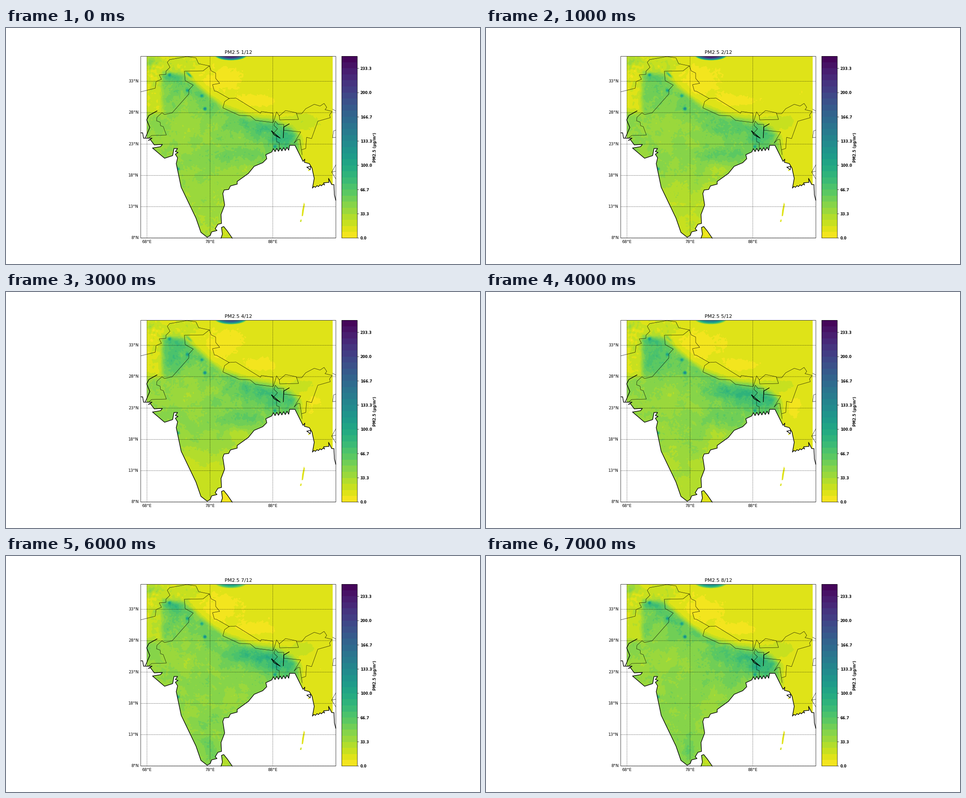
A matplotlib script that plays this animation: 1058x529 px, repeating every 8 s.

```python
import matplotlib.pyplot as plt
import numpy as np
from matplotlib.animation import FuncAnimation
from matplotlib.colors import ListedColormap
from matplotlib.patches import PathPatch, Rectangle
from matplotlib.path import Path

W, H = 1058, 529
BANDS, V_MAX = 30, 250
TOP, BOTTOM = 0.12 * H, 0.89 * H
DEGREE = (BOTTOM - TOP) / 29
LEFT = 518.5 - 15.5 * DEGREE
RIGHT = 518.5 + 15.5 * DEGREE
DATA_LEFT, DATA_RIGHT = LEFT + 0.95 * DEGREE, RIGHT - 0.5 * DEGREE

plt.rcParams["font.family"] = "DejaVu Sans"
plt.rcParams["path.snap"] = False
viridis_r = plt.get_cmap("viridis_r")
CMAP = ListedColormap([viridis_r((i + 0.5) / BANDS) for i in range(BANDS)])


# ---- map outlines, in pixels -------------------------------------------

def zigzag(start, end, steps, height):
    """Points from start to end, every second one pushed up."""
    x = np.linspace(start[0], end[0], steps)
    y = np.linspace(start[1], end[1], steps) - height * (np.arange(steps) % 2)
    return list(zip(x, y))


WEST_COAST = [
    (301, 235), (305, 235), (307, 247), (314, 247), (326, 247), (318, 252),
    (322, 250), (331, 262), (349, 261), (345, 266), (327, 269), (354, 292),
    (372, 286), (375, 270), (383, 270), (378, 277), (384, 279), (378, 283),
    (383, 291), (380, 304), (391, 357), (424, 426), (435, 458), (449, 469)]
EAST_COAST = [
    (456, 465), (459, 457), (471, 454), (467, 450), (473, 440), (481, 438),
    (480, 418), (488, 397), (484, 371), (487, 363), (497, 362), (501, 354),
    (516, 350), (516, 344), (541, 326), (554, 310), (573, 302), (582, 293),
    (580, 284)]
GANGES_MOUTHS = zigzag((593, 278), (631, 274), 11, 7)
BURMA_COAST = [
    (633, 263), (645, 263), (663, 299), (667, 294), (666, 301), (677, 304),
    (683, 314), (688, 337)]
IRRAWADDY_MOUTHS = zigzag((684, 359), (711, 352), 9, 3)
COAST = (WEST_COAST + EAST_COAST + GANGES_MOUTHS + BURMA_COAST
         + IRRAWADDY_MOUTHS
         + [(709, 347), (721, 346), (720, 337), (727, 351), (732, 351),
            (733, 374), (736, 386)])
ISLAND = [(480, 471), (483, 462), (481, 447), (486, 445), (494, 455),
          (505, 471)]
HEAVY_LINES = [
    COAST, ISLAND,
    [(672, 312), (680, 310), (679, 318), (672, 312)],
    [(337, 186), (319, 196), (314, 206), (321, 223), (311, 246)],
    [(593, 231), (612, 247), (598, 239), (593, 231)],
    [(632, 215), (620, 222), (619, 246)]]
NORTH_BORDERS = [
    [(301, 143), (333, 135), (335, 120), (347, 115), (342, 105), (357, 104),
     (357, 97), (366, 88), (360, 77), (365, 71), (404, 64), (424, 67),
     (430, 80), (454, 85), (440, 96), (398, 97), (400, 118), (418, 128),
     (408, 139), (408, 148), (371, 190), (354, 194), (348, 190), (337, 200),
     (336, 208), (344, 211), (345, 219), (351, 221), (358, 240), (325, 241),
     (318, 247)],
    [(454, 85), (458, 96), (468, 101), (468, 113), (477, 124), (461, 127),
     (465, 141), (470, 142), (498, 158), (513, 157), (568, 191), (570, 187),
     (596, 191), (596, 212), (557, 207), (545, 197), (521, 196), (484, 179),
     (488, 165), (498, 158)]]
EAST_BORDERS = [
    [(597, 211), (604, 188), (610, 197), (624, 185), (648, 190), (653, 205),
     (611, 206), (610, 197)],
    [(648, 192), (660, 192), (669, 181), (688, 171), (701, 175), (710, 169),
     (716, 178), (712, 183), (728, 187), (722, 195), (724, 201), (696, 209),
     (682, 248), (671, 245), (669, 270), (660, 273)],
    [(610, 274), (610, 257), (604, 255), (604, 243), (596, 237), (606, 226),
     (598, 218), (601, 209), (607, 216), (620, 216), (620, 229), (658, 233),
     (643, 258), (651, 250), (656, 250), (661, 284)],
    [(729, 182), (736, 186)],
    [(736, 229), (731, 231), (729, 246), (736, 245)],
    [(736, 307), (727, 323), (736, 338)], [(727, 323), (736, 321)]]
ISLETS = [
    [(665, 391), (667, 396), (663, 421), (660, 422), (661, 409)],
    [(658, 429), (660, 430), (659, 435), (656, 434)],
    [(674, 319), (676, 317), (678, 319), (676, 321)]]

# ---- concentration model -----------------------------------------------

X0, X1, Y0, Y1 = 274, 770, 24, 511
X, Y = np.meshgrid(np.arange(X0, X1) + 0.5, np.arange(Y0, Y1) + 0.5)


def smooth(a, sigma):
    fy = np.fft.fftfreq(a.shape[0])[:, None]
    fx = np.fft.rfftfreq(a.shape[1])
    kernel = np.exp(-2 * (np.pi * sigma) ** 2 * (fx**2 + fy**2))
    return np.fft.irfft2(np.fft.rfft2(a) * kernel, a.shape)


def noise(rng, sigma):
    n = smooth(rng.standard_normal(X.shape), sigma)
    return n / n.std()


def bump(x, y, sx, sy):
    return np.exp(-(((X - x) / sx) ** 2 + ((Y - y) / sy) ** 2) / 2)


def step(distance, softness):
    return 1 / (1 + np.exp(-np.clip(distance / softness, -40, 40)))


def wave(month, mean, swing, peak, period=8):
    return mean + swing * np.cos(2 * np.pi * (month - peak) / period)


# The mountain foot bounds the hazy plain on the north.
foot_x, foot_y = zip((345, 97), (400, 106), (450, 149), (484, 176),
                     (520, 190), (557, 201), (600, 208), (625, 220),
                     (660, 240))
depth = 0.85 * (Y - np.interp(X, foot_x, foot_y))
west_edge = np.maximum(step(X - 348, 3), step(Y - 190, 4))
plain = step(depth, 3.5) * west_edge * step(655 - X, 4)
south = step(Y - 355, 14)
belt = np.exp(-(depth / 48) ** 2)

terrain_rng = np.random.default_rng(5)
terrain = 0.03 * noise(terrain_rng, 1.3) + 0.04 * noise(terrain_rng, 5)
rugged = bump(385, 85, 45, 16) + bump(328, 100, 16, 50)
ridges = rugged * noise(terrain_rng, 2.5)
dome = np.clip(1.2 * (1 - ((X - 502) / 37) ** 2 - ((Y - 61) / 12) ** 2), 0, 1)

CITIES = [(444, 181), (365, 105), (405, 140), (437, 152), (384, 316),
          (600, 266)]
cities = sum(55 * bump(x, y, 2.3, 2.3) for x, y in CITIES)
cities += 45 * bump(*CITIES[0], 2.3, 2.3)
lake_valley = np.exp(-((X - 409) / 6) ** 2
                     - ((0.75 * (X - 409) - (Y - 105)) / 3.5) ** 2)


def plain_haze(m):
    haze = 32 + south * (wave(m, 32, 14, 7.2) - 43)
    haze += belt * wave(m, 14, 3, 7)
    haze += wave(m, 11, 9, 4.3) * bump(378, 140, 24, 30)    # Punjab
    haze += wave(m, 14, 6, 7.5) * bump(368, 107, 16, 9)     # Peshawar
    haze += wave(m, 18, 7, 5.8) * bump(548, 226, 36, 12)    # Bihar
    haze += wave(m, 24, 5, 6.5) * bump(608, 248, 24, 18)    # Bengal
    haze += wave(m, 13, 9, 3) * bump(525, 284, 32, 13)      # Chhattisgarh
    haze += wave(m, -8, 6, 7.5) * bump(522, 322, 22, 18)    # Eastern Ghats
    haze -= 7 * bump(390, 232, 50, 26)                      # Thar
    haze += 9 * max(0, m - 6) * bump(455, 437, 13, 16)      # Tamil Nadu
    return haze - 18 * bump(492, 462, 12, 14)               # Sri Lanka


def highland_haze(m):
    haze = wave(m, 18, 8, 8.5) * bump(322, 72, 18, 12)      # Kabul
    haze += wave(m, 7, 5, 7) * bump(330, 150, 16, 40)
    haze += 13 * bump(395, 82, 25, 14)                      # Kashmir
    haze += 11 * bump(655, 210, 32, 13)                     # Assam
    haze -= 5 * bump(480, 115, 45, 28)                      # Tibet
    haze -= 5 * bump(565, 163, 38, 12)
    haze -= wave(m, 2, 3, 5) * bump(685, 250, 16, 32)       # Burma
    return haze - 3 * bump(662, 415, 20, 40)


def concentration(month):
    rng = np.random.default_rng(100 + month)
    texture = terrain + 0.02 * noise(rng, 1.3) + 0.05 * noise(rng, 9)
    field = 11.5 + plain * plain_haze(month) + highland_haze(month)
    field = (field + 4 * ridges) * (1 + texture) + cities
    field += max(0, 90 - 11 * month) * lake_valley
    return np.maximum(field, wave(month, 165, 65, 1.8, 10) * dome**0.8)


# ---- drawing -----------------------------------------------------------

fig = plt.figure(figsize=(16, 8), dpi=W / 16, facecolor="white")
ax = fig.add_axes([0, 0, 1, 1])
ax.axis("off")


def line(points, width, **style):
    x, y = zip(*points)
    ax.plot(x, y, color="black", lw=width, **style)


def frame(x0, x1):
    ax.add_patch(Rectangle((x0, TOP), x1 - x0, BOTTOM - TOP, fill=False,
                           ec="black", lw=0.8, zorder=6))


def closed(points):
    return Path(points + points[:1], closed=True)


first, last = COAST.index((314, 247)), COAST.index((727, 351))
mainland = ([(DATA_LEFT, TOP), (DATA_LEFT, 247)] + COAST[first:last + 1]
            + [(DATA_RIGHT, 351), (DATA_RIGHT, TOP)])
land = PathPatch(
    Path.make_compound_path(*map(closed, [mainland, ISLAND] + ISLETS)),
    transform=ax.transData)
image = ax.imshow(np.zeros(X.shape), cmap=CMAP, vmin=0, vmax=V_MAX,
                  extent=(X0, X1, Y1, Y0), origin="upper", aspect="auto",
                  interpolation="nearest", zorder=1)
image.set_clip_path(land)

map_area = Rectangle((LEFT, TOP), RIGHT - LEFT, BOTTOM - TOP,
                     transform=ax.transData)
for points in NORTH_BORDERS + EAST_BORDERS:
    line(points, 0.7, zorder=3, clip_path=map_area)
for points in HEAVY_LINES:
    line(points, 1.5, zorder=4, clip_path=map_area)

GRID = dict(zorder=5, dashes=(3.7, 1.6))
for lat in range(8, 37, 5):
    y = BOTTOM - (lat - 8) * DEGREE
    line([(LEFT, y), (RIGHT, y)], 0.5, **GRID)
    ax.text(LEFT - 4.6, y, f"{lat}°N", size=10, ha="right", va="center")
for lon in range(68, 98, 10):
    x = LEFT + (lon - 67) * DEGREE
    line([(x, TOP), (x, BOTTOM)], 0.5, **GRID)
    ax.text(x, 480, f"{lon}°E", size=10, ha="center", va="center")
frame(LEFT, RIGHT)

BAR_LEFT, BAR_RIGHT = 749.4, 784.2
ax.imshow(np.arange(BANDS)[::-1, None], cmap=CMAP, aspect="auto",
          extent=(BAR_LEFT, BAR_RIGHT, BOTTOM, TOP), interpolation="nearest")
frame(BAR_LEFT, BAR_RIGHT)
for value in np.arange(8) * 100 / 3:
    y = BOTTOM - (BOTTOM - TOP) * value / V_MAX
    line([(BAR_RIGHT, y), (BAR_RIGHT + 3.2, y)], 0.8)
    ax.text(BAR_RIGHT + 6.4, y, f"{value:.1f}", size=9, weight="bold",
            va="center_baseline")
ax.text(823.7, (TOP + BOTTOM) / 2, "PM2.5 (μg/m³)", size=9, weight="bold",
        rotation=90, ha="center", va="center")
title = ax.text(518.5, TOP - 5.5, "", size=12, ha="center", va="baseline")

ax.set_xlim(0, W)
ax.set_ylim(H, 0)


def update(i):
    month = i + 1
    image.set_data(concentration(month))
    title.set_text(f"PM2.5 {month}/12")
    return image, title


anim = FuncAnimation(fig, update, frames=8, interval=1000, repeat=True)
plt.show()
```
